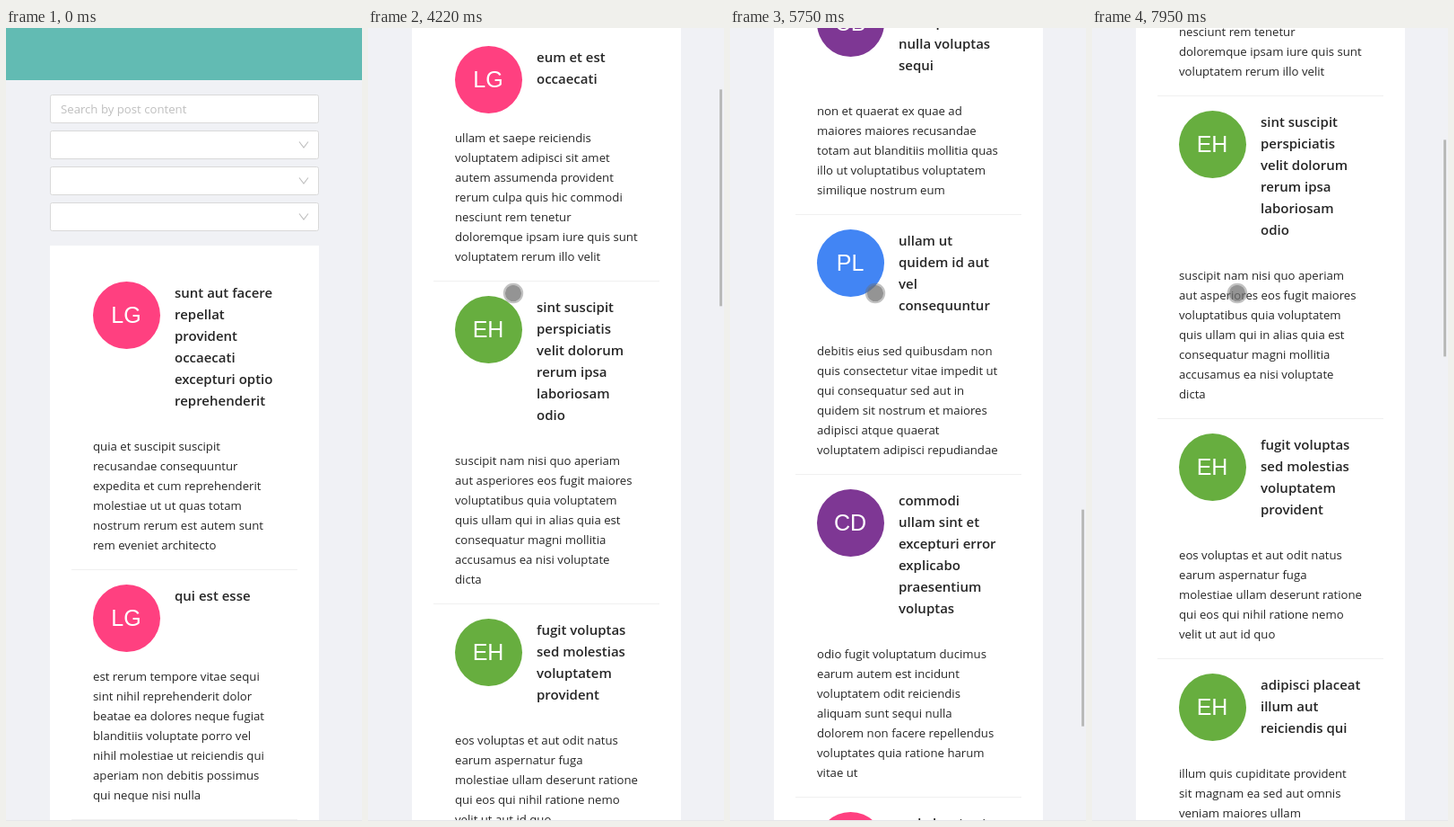
Animation of 397x882 px, one loop 8 s. Source, as an HTML page:

```html
<!DOCTYPE html>
<html lang="en">
<head>
<meta charset="utf-8">
<title>Post search</title>
<style>
html, body { margin: 0; width: 100%; height: 100%; overflow: hidden; background: #f0f1f5; }
svg { display: block; width: 100%; height: 100%; }
text { font: 13.2px "Open Sans", "Noto Sans", sans-serif; fill: #262626; white-space: pre; }
.title { font-size: 15px; font-weight: 600; }
.page { font-weight: 600; fill: #391085; }
.initials { font: 25px "Liberation Sans", Arial, sans-serif; fill: #fff; text-anchor: middle; }
.mid { text-anchor: middle; }
.hint { fill: #bfbfbf; }
</style>
</head>
<body>
<svg id="stage" viewBox="0 0 397 882" preserveAspectRatio="xMinYMin meet"></svg>
<script>
const LOOP = 8000;
const PINK = '#ff4080', GREEN = '#67ae3f', PURPLE = '#7e3794', BLUE = '#4285f4';

// initials | colour | title lines | body lines
const allPosts = [
  ['LG', PINK, 'sunt aut facere/repellat/provident/occaecati/excepturi optio/reprehenderit',
    'quia et suscipit suscipit/recusandae consequuntur/expedita et cum reprehenderit/molestiae ut ut quas totam/nostrum rerum est autem sunt/rem eveniet architecto'],
  ['LG', PINK, 'qui est esse',
    'est rerum tempore vitae sequi/sint nihil reprehenderit dolor/beatae ea dolores neque fugiat/blanditiis voluptate porro vel/nihil molestiae ut reiciendis qui/aperiam non debitis possimus/qui neque nisi nulla'],
];
const foundPosts = [
  ['LG', PINK, 'eum et est/occaecati',
    'ullam et saepe reiciendis/voluptatem adipisci sit amet/autem assumenda provident/rerum culpa quis hic commodi/nesciunt rem tenetur/doloremque ipsam iure quis sunt/voluptatem rerum illo velit'],
  ['EH', GREEN, 'sint suscipit/perspiciatis/velit dolorum/rerum ipsa/laboriosam/odio',
    'suscipit nam nisi quo aperiam/aut asperiores eos fugit maiores/voluptatibus quia voluptatem/quis ullam qui in alias quia est/consequatur magni mollitia/accusamus ea nisi voluptate/dicta'],
  ['EH', GREEN, 'fugit voluptas/sed molestias/voluptatem/provident',
    'eos voluptas et aut odit natus/earum aspernatur fuga/molestiae ullam deserunt ratione/qui eos qui nihil ratione nemo/velit ut aut id quo'],
  ['EH', GREEN, 'adipisci placeat/illum aut/reiciendis qui',
    'illum quis cupiditate provident/sit magnam ea sed aut omnis/veniam maiores ullam/consequatur atque adipisci quo/iste expedita sit quos voluptas'],
  ['CB', PURPLE, 'maxime id/vitae nihil/numquam',
    'veritatis unde neque eligendi/quae quod architecto quo neque/vitae est illo sit tempora/doloremque fugit quod et et vel/beatae sequi ullam sed tenetur/perspiciatis'],
  ['CB', PURPLE, 'rem alias/distinctio quo/quis',
    'ullam consequatur ut omnis quis/sit vel consequuntur ipsa/eligendi ipsum molestiae et/omnis error nostrum molestiae/illo tempore quia et distinctio'],
  ['CB', PURPLE, 'delectus ullam/et corporis/nulla voluptas/sequi',
    'non et quaerat ex quae ad/maiores maiores recusandae/totam aut blanditiis mollitia quas/illo ut voluptatibus voluptatem/similique nostrum eum'],
  ['PL', BLUE, 'ullam ut/quidem id aut/vel/consequuntur',
    'debitis eius sed quibusdam non/quis consectetur vitae impedit ut/qui consequatur sed aut in/quidem sit nostrum et maiores/adipisci atque quaerat/voluptatem adipisci repudiandae'],
  ['CD', PURPLE, 'commodi/ullam sint et/excepturi error/explicabo/praesentium/voluptas',
    'odio fugit voluptatum ducimus/earum autem est incidunt/voluptatem odit reiciendis/aliquam sunt sequi nulla/dolorem non facere repellendus/voluptates quia ratione harum/vitae ut'],
  ['MDS', PINK, 'sed ab est est',
    'at pariatur consequuntur earum/quidem quo est laudantium/soluta voluptatem qui ullam et/est et cum voluptas voluptatum/repellat est'],
];

// time, scroll offset
const scrollKeys = [
  [3950, 0], [4080, 70], [4219, 262], [4288, 370], [4426, 520], [4580, 520],
  [4650, 560], [4788, 850], [4926, 1190], [4995, 1285], [5130, 1285],
  [5200, 1301], [5269, 1360], [5476, 1680], [5752, 2080], [5959, 2300], [6097, 2339], [6430, 2339],
  [6500, 2337], [6569, 2330], [6638, 2270], [6776, 1960], [6914, 1640], [7050, 1640],
  [7120, 1600], [7258, 1340], [7396, 1031], [7534, 820], [7672, 660], [7810, 550], [7948, 468],
];
// time, x, y
const pointerKeys = [
  [260, 359, 629], [540, 270, 330], [820, 140, 130], [1030, 88, 86], [1100, 92, 97],
  [1370, 123, 92], [3390, 123, 92], [3530, 135, 150], [3740, 160, 280], [3880, 162, 295],
];
const typed = [[1840, 'u'], [2040, 'ul'], [2170, 'ull'], [2370, 'ulla'], [2500, 'ullam']];
const FOUND_AT = 2770;

// Motion is held in steps, counted afresh from the start of each burst.
const STEP = 69;
const bursts = [260, 1100, 3460, 4650, 5200, 6500, 7120];

const stage = document.getElementById('stage');

function add(parent, tag, attrs = {}, content) {
  const el = document.createElementNS('http://www.w3.org/2000/svg', tag);
  for (const key in attrs) el.setAttribute(key, attrs[key]);
  if (content) el.textContent = content;
  return parent.appendChild(el);
}
const fillRect = (parent, x, y, width, height, fill) =>
  add(parent, 'rect', { x, y, width, height, fill });
const box = (parent, x, y, w, h, stroke = '#d9d9d9') =>
  add(parent, 'rect', { x: x + .5, y: y + .5, width: w - 1, height: h - 1, rx: 2, fill: '#fff', stroke });
const label = (parent, x, y, content, cls = '') =>
  add(parent, 'text', { x, y, class: cls }, content);
const chevron = (parent, points) =>
  add(parent, 'polyline', { points, fill: 'none', stroke: '#bfbfbf', 'stroke-width': 1.1 });

// Draws posts below each other and returns the y under the last one.
function drawPosts(parent, posts) {
  let top = 266;
  for (const [initials, color, title, body] of posts) {
    const titles = title.split('/'), lines = body.split('/');
    const y = top + 16;
    add(parent, 'circle', { cx: 134.5, cy: y + 37.5, r: 37.5, fill: color });
    const mark = label(parent, 134, y + 45.5, initials, 'initials');
    if (initials.length > 2) mark.style.fontSize = '23.65px';
    titles.forEach((line, i) => label(parent, 188, y + 18 + 24 * i, line, 'title'));
    const bodyTop = y + Math.max(75, 24 * titles.length + 12) + 16;
    lines.forEach((line, i) => label(parent, 97, bodyTop + 16 + 22 * i, line));
    const end = bodyTop + 22 * lines.length + 16;
    fillRect(parent, 73, end, 252, 1, '#f0f0f0');
    top = end + 1;
  }
  return top;
}

fillRect(stage, 0, 0, 397, 882, '#f0f1f5');
const page = add(stage, 'g');
fillRect(page, 0, 0, 397, 58, '#62bbb3');

box(page, 49, 74, 300, 32);
const focus = add(page, 'g');
add(focus, 'rect', { x: 48, y: 73, width: 302, height: 34, rx: 3, fill: 'none', stroke: '#531dab', 'stroke-opacity': .25, 'stroke-width': 2 });
box(focus, 49, 74, 300, 32, '#531dab');
const hint = label(page, 61, 95, 'Search by post content', 'hint');
const entry = label(page, 61, 95, '');
const caret = fillRect(page, 61, 81, 1, 19, '#000');

for (const y of [114, 154, 194]) {
  box(page, 49, y, 300, 32);
  chevron(page, `327,${y + 12.5} 332,${y + 19} 337,${y + 12.5}`);
}

const allList = add(page, 'g');
fillRect(allList, 49, 242, 300, 700, '#fff');
drawPosts(allList, allPosts);

const foundList = add(page, 'g');
const card = fillRect(foundList, 49, 242, 300, 0, '#fff');
const pagerY = drawPosts(foundList, foundPosts) + 24;
card.setAttribute('height', pagerY + 56 - 242);
box(foundList, 213, pagerY, 32, 32);
box(foundList, 253, pagerY, 32, 32, '#391085');
box(foundList, 293, pagerY, 32, 32);
chevron(foundList, `232,${pagerY + 12} 226,${pagerY + 16.5} 232,${pagerY + 21}`);
chevron(foundList, `306,${pagerY + 12} 312,${pagerY + 16.5} 306,${pagerY + 21}`);
label(foundList, 269, pagerY + 21, '1', 'page mid');
label(foundList, 199, pagerY + 96, 'Fancy Search Bar', 'mid');

const thumb = fillRect(stage, 392, 0, 3, 241, '#b9bab9');
const pointer = add(stage, 'g');
add(pointer, 'circle', { r: 10.2, fill: 'none', stroke: '#6e6e6e', 'stroke-opacity': .42, 'stroke-width': 2 });
add(pointer, 'circle', { r: 9.2, fill: '#6e6e6e', 'fill-opacity': .74 });
fillRect(stage, 0, 881, 397, 1, '#e6e7ea');

const show = (el, on) => el.setAttribute('display', on ? 'inline' : 'none');

function sample(keys, t) {
  if (t <= keys[0][0]) return keys[0].slice(1);
  const i = keys.findIndex(key => key[0] > t);
  if (i < 0) return keys[keys.length - 1].slice(1);
  const a = keys[i - 1], b = keys[i];
  const k = (t - a[0]) / (b[0] - a[0]);
  return a.slice(1).map((v, n) => v + (b[n + 1] - v) * k);
}

function held(t) {
  const start = bursts.filter(b => b <= t).pop() || 0;
  return start + Math.floor((t - start) / STEP) * STEP;
}

function caretOn(t) {
  return t >= 1100 && !(t >= 1640 && t < 1840) && !(t >= 2980 && t < 3460);
}

function draw(t) {
  const step = held(t);
  const scroll = Math.round(sample(scrollKeys, step)[0]);
  page.setAttribute('transform', `translate(0 ${-scroll})`);
  show(thumb, scroll > 0);
  thumb.setAttribute('y', scroll * .272 - 2.9);

  const [x, y] = sample(pointerKeys, step);
  show(pointer, t >= 260);
  pointer.setAttribute('transform', `translate(${x} ${y})`);

  focus.setAttribute('opacity', Math.min(1, Math.max(0, (step - 1030) / 300)));
  const last = typed.filter(key => key[0] <= t).pop();
  entry.textContent = last ? last[1] : '';
  show(hint, !last);
  show(caret, caretOn(t));
  caret.setAttribute('x', 61 + (last ? Math.round(entry.getComputedTextLength()) : 0));

  show(allList, t < FOUND_AT);
  show(foundList, t >= FOUND_AT);
}

const begin = performance.now();
function tick() {
  draw((performance.now() - begin) % LOOP);
  requestAnimationFrame(tick);
}
tick();
</script>
</body>
</html>
```
